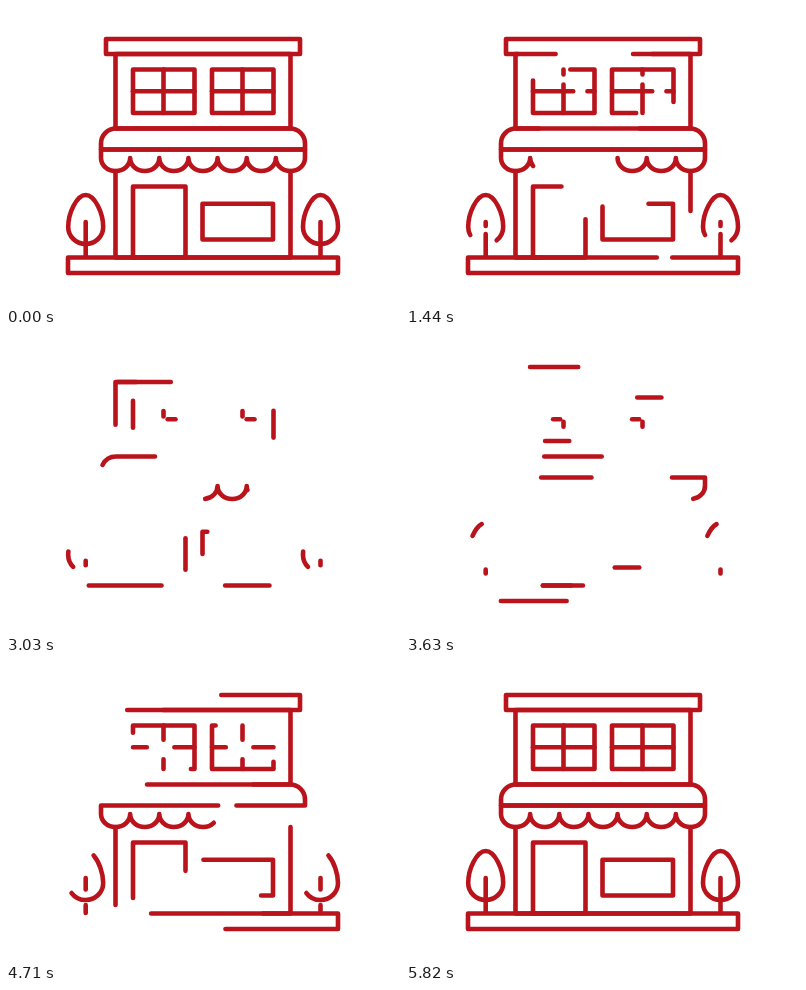
Animation, 394 px wide and 300 px high, one loop 6.27 s. Source, as an HTML page:

```html
<!DOCTYPE html>
<html lang="en">
<head>
<meta charset="utf-8">
<title>Storefront line drawing</title>
<style>
  html, body { margin: 0; width: 100%; height: 100%; overflow: hidden; background: #fff; }
  svg { display: block; width: 394px; height: 300px; }
  path {
    fill: none;
    stroke: #b9131b;
    stroke-width: 4.6;
    stroke-linecap: round;
    stroke-linejoin: round;
  }
</style>
</head>
<body>
<svg id="stage" viewBox="0 0 394 300"></svg>
<script>
const LOOP = 6270, START = 870, SPAN = 4950, STEP = 30;
const UNITS = 1000; // every path is normalised to this length

const scallops = 'a14.571 13 0 0 0 29.143 0'.repeat(7);

const tree = x => [
  `M${x + 17.5} 221A17.5 17 0 0 1 ${x - 17.5} 221` +
    `C${x - 17.5} 207 ${x - 9} 189 ${x} 189` +
    `C${x + 9} 189 ${x + 17.5} 207 ${x + 17.5} 221Z`,
  `M${x} 216V251`
];

const cross = (x, right) => [`M${x} 63.5V107`, `M${right} 85.3H${right - 61.5}`];

// The start point and direction of each path decide where its gap opens.
const shapes = [
  'M294 48H100V33H294Z',                          // roof
  'M284.5 48H109.5V122.5H284.5Z',                 // upper wall
  'M284.5 165V251.5H109.5V165',                   // lower wall
  'M188.5 63.5H127V107H188.5Z',                   // left window
  ...cross(157.5, 188.5),
  'M206 107H267.5V63.5H206Z',                     // right window
  ...cross(236.5, 267.5),
  'M284 122.5H110a15 15 0 0 0-15 15V143.5H299V137.5a15 15 0 0 0-15-15Z',
  `M95 143.5V152${scallops}V143.5Z`,              // awning edge
  'M127 180.5H179.5V251.5H127Z',                  // door
  'M267 197.7H196.5V233.5H267Z',                  // shop window
  ...tree(79.7),
  ...tree(314.5),
  'M332 251.5H62V267H332Z'                        // ground
];

const stage = document.getElementById('stage');
stage.innerHTML = shapes.map(d => `<path pathLength="${UNITS}" d="${d}"/>`).join('');

// The visible part shrinks to nothing and grows back while circling each path twice.
function draw(time) {
  const now = Math.floor((time % LOOP) / STEP) * STEP;
  const u = Math.min(1, Math.max(0, (now - START) / SPAN));
  const visible = Math.abs(1 - 2 * u);
  const from = (2 * u + 0.5 - visible / 2 + 1) % 1;
  const whole = u === 0 || u === 1;
  stage.style.strokeDasharray = whole ? 'none' : `${visible * UNITS} ${(1 - visible) * UNITS}`;
  stage.style.strokeDashoffset = whole ? 0 : (1 - from) * UNITS;
}

const begin = performance.now();
function tick() {
  draw(performance.now() - begin);
  requestAnimationFrame(tick);
}
draw(0);
requestAnimationFrame(tick);
</script>
</body>
</html>
```
